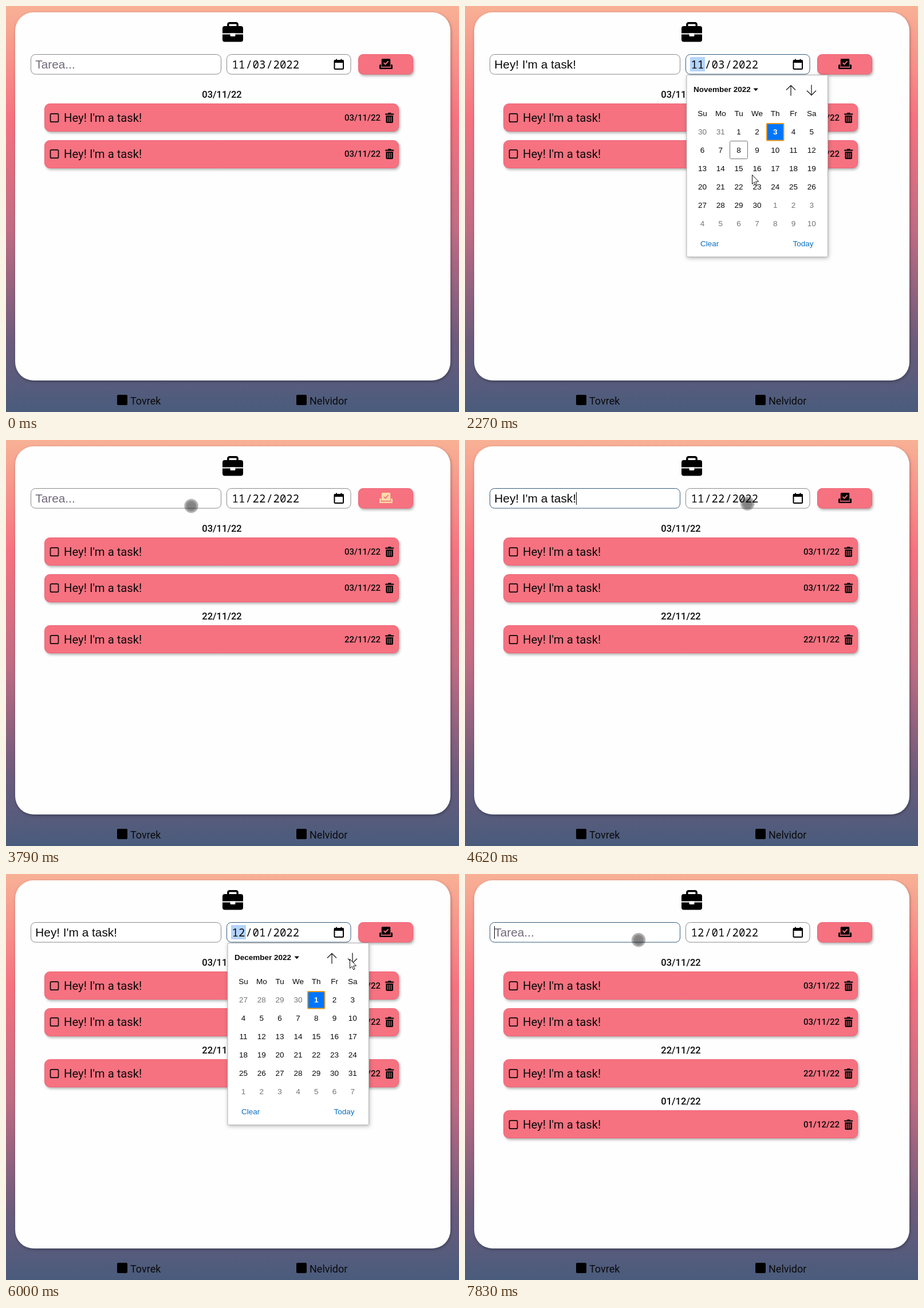
Animation of 791x708 px, one loop 8 s. Source, as an HTML page with a canvas:

```html
<!DOCTYPE html>
<html lang="es">
<head>
<meta charset="utf-8">
<title>Tareas</title>
<style>
  html, body { margin: 0; width: 100%; height: 100%; overflow: hidden; }
  canvas { display: block; }
</style>
</head>
<body>
<canvas id="stage" width="791" height="708"></canvas>
<script>
const ctx = document.getElementById('stage').getContext('2d');
const LOOP = 8000;
const PINK = '#f67280', CREAM = '#fbdba7', NAVY = '#355c7d', INK = '#0a0a0a';
const SANS = '"Liberation Sans", Arial, sans-serif';
const ROBOTO = 'Roboto, sans-serif';
const MONO = '"Noto Sans Mono", monospace';
const TASK = "Hey! I'm a task!";

// Pointer stops: time, x, y
const PATH = [
  [260, 653, 660], [1020, 267, 113], [1320, 267, 113], [1990, 586, 103],
  [2100, 586, 104], [2270, 501, 294], [2410, 493, 312], [2610, 493, 312],
  [3170, 636, 114], [3420, 636, 114], [3800, 323, 115], [4130, 313, 112],
  [4290, 313, 112], [4840, 590, 110], [5160, 590, 110], [5370, 563, 314],
  [5860, 600, 148], [6000, 600, 148], [6330, 636, 114], [7240, 636, 114],
  [7400, 662, 133], [7770, 303, 115]
];

const within = (t, ...spans) => spans.some(([a, b]) => t >= a && t < b);

function pointerAt(t) {
  const i = PATH.findIndex(p => p[0] > t);
  if (i < 0) return PATH[PATH.length - 1].slice(1);
  const [t0, x0, y0] = PATH[i - 1], [t1, x1, y1] = PATH[i];
  const u = (t - t0) / (t1 - t0), k = u * u * (3 - 2 * u);
  return [x0 + (x1 - x0) * k, y0 + (y1 - y0) * k];
}

function box(x, y, w, h, r, fill, stroke, shadow, line = 1) {
  ctx.save();
  ctx.beginPath();
  ctx.roundRect(x, y, w, h, r);
  if (shadow) {
    [ctx.shadowOffsetX, ctx.shadowOffsetY, ctx.shadowBlur] = shadow;
    ctx.shadowColor = 'rgba(0,0,0,.3)';
  }
  if (fill) { ctx.fillStyle = fill; ctx.fill(); }
  ctx.shadowColor = 'transparent';
  if (stroke) { ctx.strokeStyle = stroke; ctx.lineWidth = line; ctx.stroke(); }
  ctx.restore();
}

function text(str, x, y, font, color = INK, align = 'left') {
  ctx.font = font;
  ctx.fillStyle = color;
  ctx.textAlign = align;
  ctx.fillText(str, x, y);
}

function strokePath(d, color, width) {
  ctx.strokeStyle = color;
  ctx.lineWidth = width;
  ctx.stroke(new Path2D(d));
}

function fillPath(d, color) {
  ctx.fillStyle = color;
  ctx.fill(new Path2D(d));
}

function page() {
  const sky = ctx.createLinearGradient(0, 0, 0, 780);
  ['#f8b195', PINK, '#c06c84', '#6c5b7b', NAVY].forEach((c, i) => sky.addColorStop(i / 4, c));
  ctx.fillStyle = sky;
  ctx.fillRect(0, 0, 791, 708);
  box(16, 11, 760, 642, 32, '#fefefe', null, [1, 2, 5]);

  // Briefcase
  box(387.8, 29.8, 16.4, 10, 2.5, null, '#000', null, 3.4);
  box(378, 35, 36, 12.5, [4, 4, 0, 0], '#000');
  box(378, 49.5, 36, 13, [0, 0, 4, 4], '#000');
  box(391.5, 47.5, 9, 5.5, [0, 0, 1.5, 1.5], '#fefefe');

  box(194, 678, 18, 18, 2, '#000');
  text('Tovrek', 217, 695, '18px ' + ROBOTO);
  box(507, 678, 18, 18, 2, '#000');
  text('Nelvidor', 530, 695, '18px ' + ROBOTO);
}

function taskRow(center, date) {
  const top = Math.round(center - 25), c = Math.floor(center);
  box(67.5, top + .5, 618, 48, 9, PINK, '#ef6273', [2, 3, 4]);
  box(77.5, c - 7.2, 14, 14.4, 2, null, INK, null, 1.7);
  text(TASK, 101, c + 7, '20.3px ' + ROBOTO);
  text(date, 591, c + 5, '500 15px ' + ROBOTO);

  // Trash can
  box(667, c - 9, 5.5, 3, 1, INK);
  box(662, c - 7.6, 15.4, 2.4, 1, INK);
  box(663.4, c - 4, 12.6, 13, [0, 0, 2, 2], INK);
  for (const x of [666.2, 669.2, 672.2]) box(x, c - 2, 1, 9, .5, PINK);
}

function heading(date, y) {
  text(date, 377, y, '500 16.5px ' + ROBOTO, INK, 'center');
}

function taskInput(value, focused, w) {
  box(43.5, 84.5, w, 34.5, 8, '#fff', focused ? NAVY : '#8a8a8a');
  text(value || 'Tarea...', 51.3, 109, '20.8px ' + SANS, value ? INK : '#706878');
  if (focused) {
    ctx.fillStyle = '#000';
    ctx.fillRect(value ? 51.3 + ctx.measureText(value).width : 51, 91, 1, 22);
  }
}

function dateInput([m, d, y], focused, dx) {
  box(385.5 + dx, 84.5, 216.5, 34.5, 8, '#fff', focused ? NAVY : '#8a8a8a');
  if (focused) {
    ctx.fillStyle = '#b3d4fc';
    ctx.fillRect(393, 89, 26, 25);
  }
  const parts = [[m, 394.5], ['/', 418.5], [d, 430.5], ['/', 454.5], [y, 466.5]];
  for (const [str, x] of parts) text(str, x + dx, 109, '19px ' + MONO);

  // Calendar icon
  box(573.5 + dx, 95, 15.5, 15, 1.5, null, '#000', null, 2);
  ctx.fillStyle = '#000';
  ctx.fillRect(573 + dx, 94, 16.5, 5);
  ctx.fillRect(576 + dx, 92.5, 2, 3);
  ctx.fillRect(584.5 + dx, 92.5, 2, 3);
}

function addButton(color, tinted) {
  box(615.5, 84.5, 95, 34.5, 8, PINK, '#ef6273', [2, 3, 4]);
  fillPath('M653.5 102H655V106.5H654.5V107.5H672.5V106.5H672V102H673.5Q675 102 675 103.5V108.5Q675 110 673.5 110H653.5Q652 110 652 108.5V103.5Q652 102 653.5 102Z', color);
  box(655.8, 92, 15.4, 13.8, [1.5, 1.5, 0, 0], color);
  strokePath('M659.6 98.8L662.4 101.6L667.6 96.2', PINK, 1.9);
  if (tinted) {
    ctx.fillStyle = 'rgba(51,181,229,.4)';
    ctx.fillRect(614, 84, 97, 36);
  }
}

function calendar(month, selected) {
  const font = '13.5px ' + SANS, bold = 'bold ' + font;
  box(387, 120.5, 246.5, 317, 1, '#fff', '#b4b4b4', [1, 2, 7]);
  text((month === 10 ? 'November' : 'December') + ' 2022', 399, 150, bold);
  fillPath('M503.5 143.5H512L507.7 148.3Z', INK);
  strokePath('M569 156.5V138.5M561 146.5L569 138.5L577 146.5', '#222', 1.3);
  strokePath('M605 137.5V155.5M597 147.5L605 155.5L613 147.5', '#222', 1.3);

  ['Su', 'Mo', 'Tu', 'We', 'Th', 'Fr', 'Sa'].forEach((name, i) =>
    text(name, 414.5 + 31.8 * i, 191.5, font, INK, 'center'));
  const lead = new Date(2022, month, 1).getDay();
  for (let i = 0; i < 42; i++) {
    const day = new Date(2022, month, 1 - lead + i);
    const inMonth = day.getMonth() === month, n = day.getDate();
    const x = 414.5 + 31.8 * (i % 7), y = 219 + 32 * Math.floor(i / 7);
    const chosen = inMonth && n === selected;
    if (chosen) box(x - 14.8, y - 14, 29.6, 29.4, 1, '#0075ff', '#e59a1c', null, 2);
    if (day.getMonth() === 10 && n === 8 && !chosen)
      box(Math.round(x - 16) + .5, y - 15.5, 31, 31, 2, null, '#767676');
    text(n, x, y + 4.8, chosen ? bold : font, chosen ? '#fff' : inMonth ? INK : '#757575', 'center');
  }
  text('Clear', 411, 418.5, font, '#0b6fc2');
  text('Today', 572.5, 418.5, font, '#0b6fc2');
}

function touchDot(x, y) {
  const dot = ctx.createRadialGradient(x, y, 0, x, y, 13);
  [[0, .5], [.6, .47], [.74, .34], [.88, .29], [1, 0]].forEach(([stop, a]) =>
    dot.addColorStop(stop, `rgba(0,0,0,${a})`));
  ctx.fillStyle = dot;
  ctx.fillRect(x - 13, y - 13, 26, 26);
}

function arrow(x, y) {
  ctx.save();
  ctx.translate(x + .5, y + .5);
  const shape = 'M0 0V16L3.7 12.6L6.2 18.4L8.6 17.3L6.1 11.7H11.2Z';
  fillPath(shape, '#fff');
  strokePath(shape, '#111', 1);
  ctx.restore();
}

function draw(t) {
  const tinted = within(t, [3310, 3440], [6600, 6740]);
  const shift = within(t, [6600, 6740]) ? 1 : 0;
  const typed = within(t, [1290, 3240], [4270, 6530]);
  const typing = within(t, [1090, 2000], [4200, 4840], [7830, LOOP]);
  const dating = within(t, [2000, 3240], [4840, 6530]);
  const open = within(t, [2060, 2610], [4910, 6130]);
  const december = t >= 5930;
  const date = december ? ['12', '01', '2022'] : ['11', t < 2610 ? '03' : '22', '2022'];
  const tapped = within(t, [3240, 4200], [6530, 7830]);

  page();
  taskInput(typed ? TASK : '', typing, 332 - shift);
  dateInput(date, dating, -shift);
  addButton(tapped ? CREAM : '#000', tinted);

  heading('03/11/22', 160);
  taskRow(195, '03/11/22');
  taskRow(258.5, '03/11/22');
  if (t >= 3240) {
    heading('22/11/22', 313);
    taskRow(348, '22/11/22');
  }
  if (t >= 6530) {
    heading('01/12/22', 402);
    taskRow(437, '01/12/22');
  }

  if (open) calendar(december ? 11 : 10, december ? 1 : +date[1]);
  if (t >= 260) {
    const overPopup = within(t, [2110, 2610], [5165, 6130]);
    (overPopup ? arrow : touchDot)(...pointerAt(t));
  }
}

const start = performance.now();
function tick() {
  draw((performance.now() - start) % LOOP);
  requestAnimationFrame(tick);
}
tick();
</script>
</body>
</html>
```
